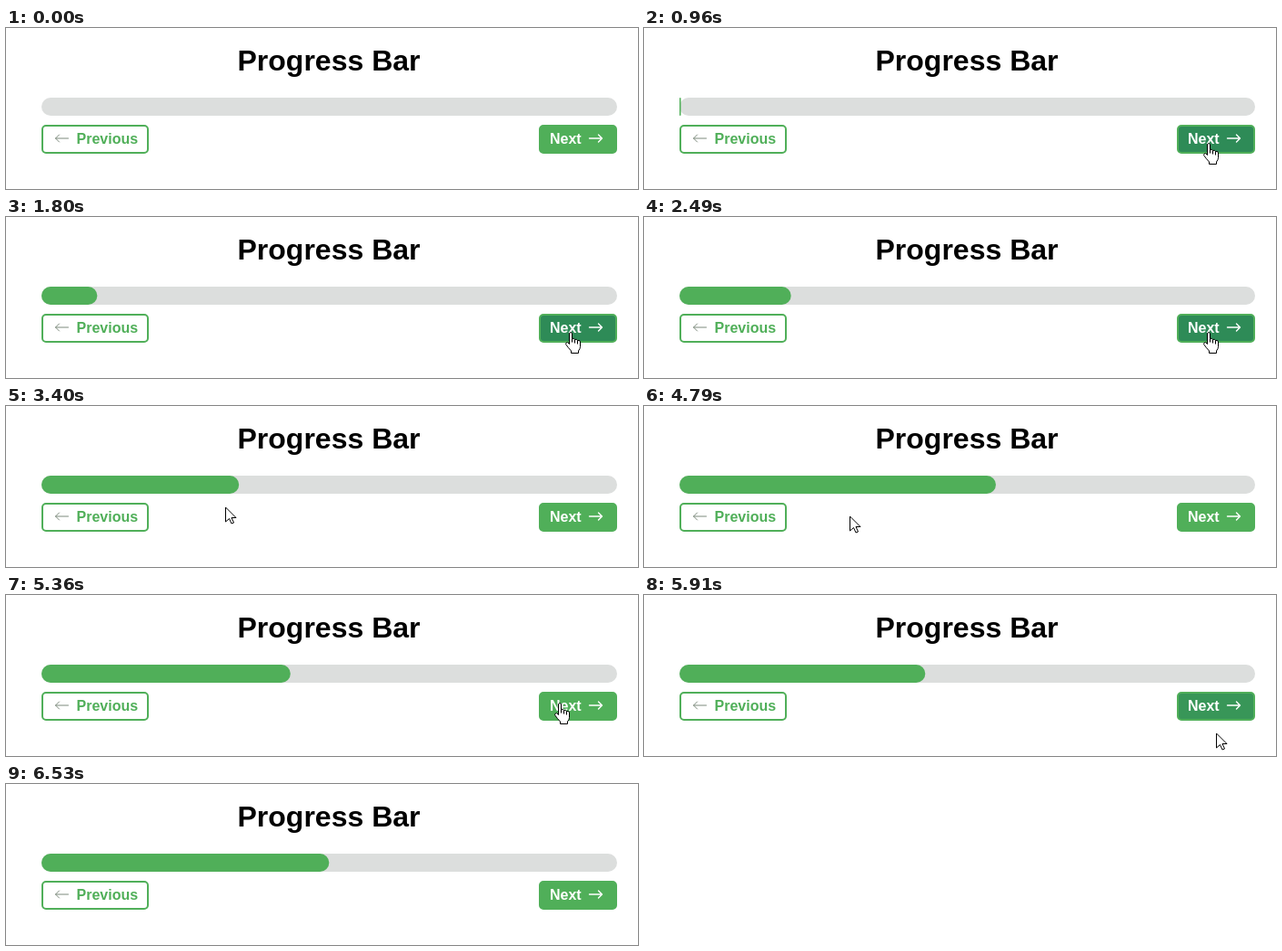
An HTML page that plays this animation: 695x178 px, repeating every 6.6 s.

```html
<!DOCTYPE html>
<html lang="en">
<head>
<meta charset="utf-8">
<title>Progress Bar</title>
<style>
  html, body { margin: 0; width: 100%; height: 100%; overflow: hidden; background: #fff; }
  svg { display: block; }
  text { font: bold 16px "Liberation Sans", Arial, sans-serif; }
  .title { font-size: 32px; text-anchor: middle; }
  .button { stroke: #50af59; stroke-width: 2; }
  .icon { fill: none; stroke-linecap: round; stroke-linejoin: round; }
  .cursor { fill: #fff; stroke: #000; stroke-linejoin: round; }
</style>
</head>
<body>
<svg width="695" height="178" viewBox="0 0 695 178">
  <text class="title" x="355" y="47">Progress Bar</text>

  <rect x="39" y="77" width="633" height="20" rx="10" fill="#dcdedd"/>
  <rect id="fill" x="39" y="77" height="20" fill="#50af59"/>

  <rect class="button" x="40" y="108" width="116" height="30" rx="4" fill="#fff"/>
  <path class="icon" d="M68.5 122h-14m4-4l-4 4 4 4" stroke="#7c8a7c"/>
  <text x="77.5" y="128" fill="#50af59">Previous</text>

  <rect class="button" id="next" x="587" y="108" width="84" height="30" rx="4"/>
  <text x="598" y="128" fill="#fff">Next</text>
  <path class="icon" d="M641.5 122h14m-4-4l4 4-4 4" stroke="#fff" stroke-width="1.4"/>

  <path id="arrow" class="cursor" d="M.5 1v16l4-3.500 2.500 5.500 2.500-1-2.500-5.500h5z"/>
  <path id="hand" class="cursor" d="M-1.500 13.500v-12q1.500-2 3 0v6q2-1 3 1 2-1 3 1 3-.5 3 1.500v5.500q0 2-2 4.500v2.500h-8v-2.500q-3-3-6-7.500 .5-2 2-2zM1.500 7.500v4m3-3v4m3-3v4"/>
</svg>
<script>
const LOOP = 6600, BAR = 633, STEP = 0.1, TRANSITION = 1000, FADE = 200;
const $ = id => document.getElementById(id);
const clamp = x => Math.min(1, Math.max(0, x));

// Steps forward (Next) or back (Previous)
const clicks = [
  { at: 850, steps: 1 }, { at: 1660, steps: 1 }, { at: 2520, steps: 1 }, { at: 3048, steps: 3 },
  { at: 4200, steps: -1 }, { at: 4680, steps: -1 }, { at: 5570, steps: 1 }
];

// Pointer glides; it rests at the end of each one
const entry = [642, 178];
const glides = [
  { start: 210, end: 760, to: [621, 127], lift: 0 },
  { start: 3040, end: 3880, to: [126, 122], lift: 17 },
  { start: 4740, end: 5340, to: [609, 119], lift: 0 },
  { start: 5650, end: 6050, to: [630, 154], lift: 0 }
];

// Times over which Next is highlighted
const hovers = [[650, 3050], [5400, 5850]];

// cubic-bezier(.42, 0, .58, 1)
function easeInOut(p) {
  if (p <= 0 || p >= 1) return clamp(p);
  let lo = 0, hi = 1, s;
  for (let i = 0; i < 24; i++) {
    s = (lo + hi) / 2;
    const x = 1.26 * (1 - s) ** 2 * s + 1.74 * (1 - s) * s * s + s ** 3;
    if (x < p) lo = s; else hi = s;
  }
  return s * s * (3 - 2 * s);
}

// Each click restarts the transition from the current width
function share(t) {
  let value = 0, target = 0;
  clicks.forEach(({ at, steps }, i) => {
    const end = Math.min(t, clicks[i + 1]?.at ?? LOOP);
    target += steps * STEP;
    value += (target - value) * easeInOut((end - at) / TRANSITION);
  });
  return value;
}

function pointer(t) {
  let [x, y] = entry;
  for (const { start, end, to, lift } of glides) {
    const e = 1 - (1 - clamp((t - start) / (end - start))) ** 2.6;
    x += (to[0] - x) * e;
    y += (to[1] - y) * e - lift * 4 * e * (1 - e);
  }
  return [Math.round(x), Math.round(y)];
}

function drawPointer(t) {
  const [x, y] = pointer(t);
  const present = t > glides[0].start && t < glides.at(-1).end;
  const onButton = y > 107 && y < 139 && (x > 39 && x < 157 || x > 586 && x < 672);
  for (const [id, shown] of [["hand", onButton], ["arrow", !onButton]]) {
    $(id).setAttribute("visibility", present && shown ? "visible" : "hidden");
    $(id).setAttribute("transform", `translate(${x} ${y})`);
  }
}

function draw() {
  const t = performance.now() % LOOP;
  const width = BAR * share(t), radius = Math.min(10, width / 2);
  $("fill").setAttribute("width", width);
  $("fill").setAttribute("rx", radius);
  $("fill").setAttribute("ry", radius);

  const hover = hovers.reduce((h, [on, off]) => h + clamp((t - on) / FADE) - clamp((t - off) / FADE), 0);
  $("next").style.fill = `color-mix(in srgb, #2e8b57 ${hover * 100}%, #50af59)`;

  drawPointer(t);
  requestAnimationFrame(draw);
}
draw();
</script>
</body>
</html>
```
